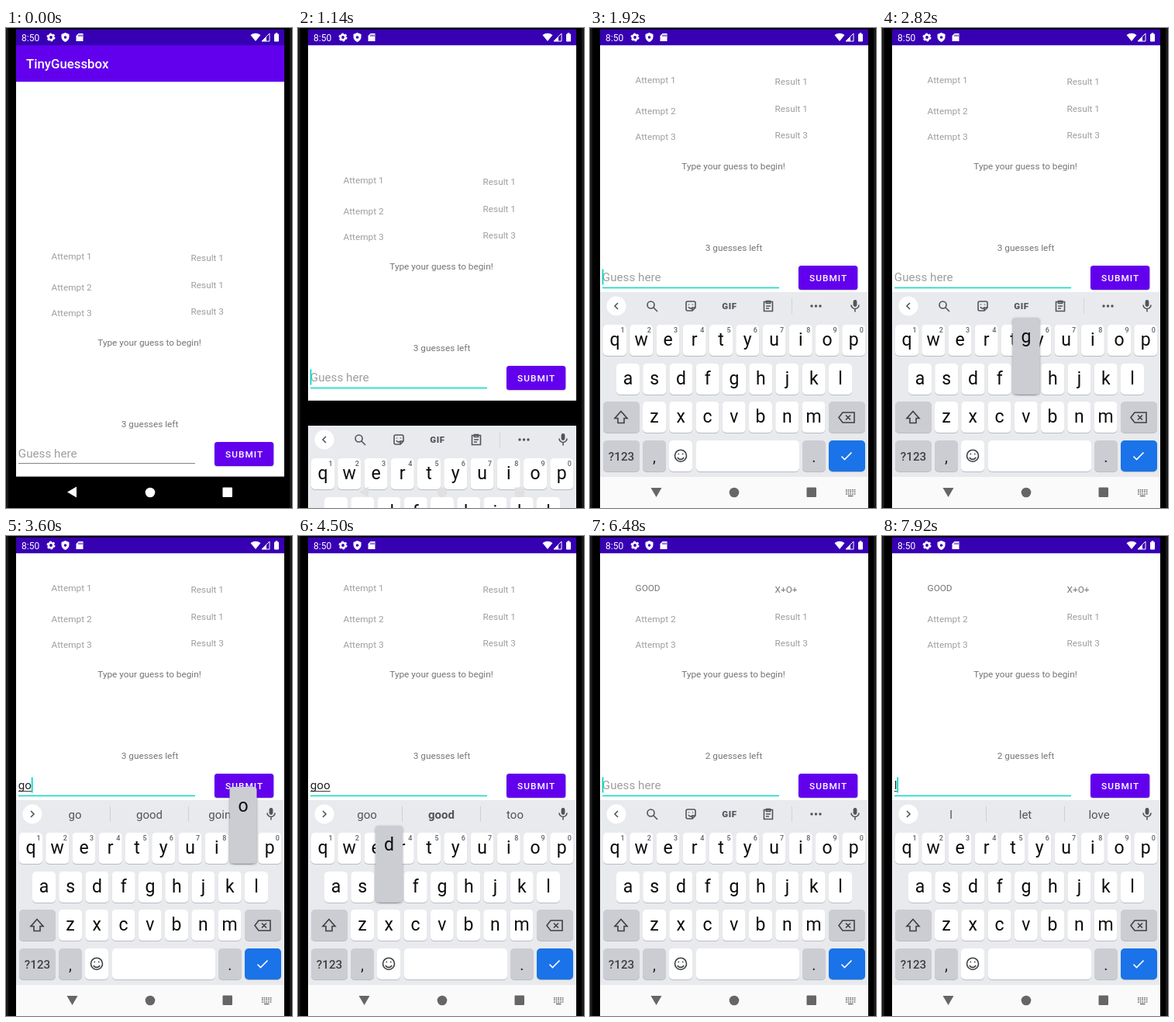
An HTML page with a canvas that plays this animation: 369x618 px, repeating every 8 s.

```html
<!DOCTYPE html>
<html lang="en">
<head>
<meta charset="utf-8">
<title>Word guessing app</title>
<style>
  html, body { margin: 0; width: 100%; height: 100%; overflow: hidden; background: #000; }
  canvas { display: block; width: 369px; height: 618px; }
</style>
</head>
<body>
<canvas id="stage"></canvas>
<script>
const W = 369, H = 618, LOOP = 8000, TICK = 60;
const canvas = document.getElementById('stage');
const ctx = canvas.getContext('2d');
const ratio = window.devicePixelRatio || 1;
canvas.width = W * ratio;
canvas.height = H * ratio;

const PURPLE = '#6200ee', TEAL = '#03dac5', GREY = '#cbcdd3', INK = '#50545a', KEY_INK = '#0c0c0d';
const STATUS_END = 22.2, APP_END = 577.8;
const SLIDE_START = 1080, SLIDE_TIME = 360, SUBMIT = 5400, CLEARED = 5460;
const PRESSES = [[2820, 'g'], [3420, 'o'], [3600, 'o'], [4500, 'd'], [7800, 'l']];
const CARET_RESETS = [940, 2880, 3470, 3650, 4550, 5410, 7850];
const SUGGESTIONS = {
  g: ['g', 'good', 'go'],
  go: ['go', 'good', 'going'],
  goo: ['goo', 'good', 'too'],
  good: ['good', 'goods', 'food'],
  l: ['l', 'let', 'love']
};

// Letter keys: [centre x, top y]
const KEYS = {};
[['qwertyuiop', 32, 382], ['asdfghjkl', 49, 432], ['zxcvbnm', 83, 481]].forEach(([row, x, y]) =>
  [...row].forEach((c, i) => KEYS[c] = [x + i * 34.25, y]));

const ICONS = {
  search: 'M3 -1.5a4.5 4.5 0 1 1 -9 0a4.5 4.5 0 1 1 9 0M2 2L7 7',
  sticker: 'M-6 -4a2 2 0 0 1 2 -2h8a2 2 0 0 1 2 2v6l-4 4h-6a2 2 0 0 1 -2 -2zM-3 1a3 3 0 0 0 5 1M-2.5 -2.5v1M2.5 -2.5v1M6 2h-4v4',
  clipboard: 'M-5.5 -5.5h11v12h-11zM-2.5 -6.5v3h5v-3zM-3 0h6M-3 3h4',
  micHead: 'M-2.4 -5a2.4 2.4 0 0 1 4.8 0v4a2.4 2.4 0 0 1 -4.8 0z',
  micStand: 'M-5 -1a5 5 0 0 0 10 0M0 4v4',
  shift: 'M0 -8L8 1H4V7H-4V1H-8Z',
  erase: 'M-10 0L-5 -6.5H10V6.5H-5ZM-1 -3l6 6M5 -3l-6 6',
  smile: 'M7.5 0a7.5 7.5 0 1 1 -15 0a7.5 7.5 0 1 1 15 0M-4 2a4.3 4.3 0 0 0 8 0M-2.7 -3v1.5M2.7 -3v1.5',
  check: 'M-6.5 0.5l4 4L6.5 -4.5',
  chevron: 'M2 -4l-4 4l4 4',
  shield: 'M0 -6L5 -4V0Q4.5 4 0 6Q-4.5 4 -5 0V-4Z',
  card: 'M-4.5 5V-2L-1.5 -5H4.5V5Z',
  wifi: 'M0 5L-6.5 -3Q0 -7.5 6.5 -3Z',
  signal: 'M-5 5L5 -5V5Z',
  back: 'M-6.5 0L5.5 -7V7Z'
};
for (const name in ICONS) ICONS[name] = new Path2D(ICONS[name]);

function box(x, y, w, h, color, radius = 0) {
  ctx.fillStyle = color;
  ctx.beginPath();
  ctx.roundRect(x, y, w, h, radius);
  ctx.fill();
}

function disc(x, y, r, color) {
  ctx.fillStyle = color;
  ctx.beginPath();
  ctx.arc(x, y, r, 0, 7);
  ctx.fill();
}

function label(text, x, y, size, color, { align = 'left', weight = 400, spacing = 0 } = {}) {
  ctx.font = `${weight} ${size}px Roboto, sans-serif`;
  ctx.textAlign = align;
  ctx.letterSpacing = spacing + 'px';
  ctx.fillStyle = color;
  ctx.fillText(text, x, y);
  return ctx.measureText(text).width;
}

function icon(name, x, y, color, { line = 1.6, fill = false, turn = 0 } = {}) {
  ctx.save();
  ctx.translate(x, y);
  ctx.rotate(turn);
  ctx.fillStyle = ctx.strokeStyle = color;
  ctx.lineWidth = line;
  if (fill) ctx.fill(ICONS[name]);
  else ctx.stroke(ICONS[name]);
  ctx.restore();
}

function withShadow(color, blur, offset, draw) {
  ctx.save();
  ctx.shadowColor = color;
  ctx.shadowBlur = blur * ratio;
  ctx.shadowOffsetY = offset * ratio;
  draw();
  ctx.restore();
}

function clipped(x, y, w, h, draw) {
  ctx.save();
  ctx.beginPath();
  ctx.rect(x, y, w, h);
  ctx.clip();
  draw();
  ctx.restore();
}

const clamp = v => Math.min(1, Math.max(0, v));

function typedText(t) {
  return PRESSES.filter(([at]) => at + TICK <= t && (t < CLEARED || at > CLEARED))
    .map(([, c]) => c).join('');
}

function caretVisible(t) {
  const reset = CARET_RESETS.filter(at => at <= t).pop();
  return reset !== undefined && Math.floor((t - reset) / 490) % 2 === 0;
}

function drawStatusBar() {
  box(13, 1.8, 346, STATUS_END - 1.8, '#3700b3');
  label('8:50', 20, 17, 12, '#fff');
  ctx.save();
  ctx.strokeStyle = '#fff';
  ctx.lineWidth = 2.6;
  ctx.beginPath();
  ctx.arc(58, 12, 3.2, 0, 7);
  ctx.stroke();
  ctx.lineWidth = 2;
  ctx.setLineDash([2.4, 2.3]);
  ctx.beginPath();
  ctx.arc(58, 12, 4.5, 0, 7);
  ctx.stroke();
  ctx.restore();
  icon('shield', 76.5, 12, '#fff', { fill: true });
  disc(76.5, 12, 1.8, '#3700b3');
  icon('card', 95, 12, '#fff', { fill: true });
  for (let i = 0; i < 3; i++) box(93.5 + i * 2, 8.5, 1, 2.5, '#3700b3');
  icon('wifi', 322, 12, '#fff', { fill: true });
  icon('signal', 335, 12, '#fff', { line: 1 });
  clipped(329, 6, 7, 12, () => icon('signal', 335, 12, '#fff', { fill: true }));
  box(346, 7.5, 6, 10, '#fff', 1);
  box(347.7, 6.3, 2.6, 2, '#fff');
}

function drawButton(t) {
  const pressed = t >= SUBMIT && t < SUBMIT + 540;
  withShadow('rgba(0,0,0,.25)', 2, 0.8, () => box(269, 533, 76.3, 31, PURPLE, 3.5));
  if (pressed) {
    const alpha = 0.13 * (1 - clamp((t - SUBMIT - 240) / 300));
    clipped(269, 533, 76.3, 31, () =>
      disc(307, 549, 15 + 30 * clamp((t - SUBMIT) / 180), `rgba(255,255,255,${alpha})`));
  }
  label('SUBMIT', 283, 553, 11.8, '#fff', { weight: 500, spacing: 1.05 });
}

function drawApp(t, text) {
  const scored = t >= CLEARED, focused = t >= 960;
  box(13, 22, 346, APP_END - 22, '#fff');
  box(13, 22, 346, 47.2, PURPLE);
  label('TinyGuessbox', 26, 52, 16.8, '#fff', { weight: 500 });

  const rows = [
    [scored ? 'GOOD' : 'Attempt 1', 58.6, 298, scored],
    ['Attempt 2', 58.6, 338], ['Attempt 3', 58.6, 371],
    [scored ? 'X+O+' : 'Result 1', 238.6, 300, scored],
    ['Result 1', 238.6, 335], ['Result 3', 238.6, 368.5]
  ];
  for (const [str, x, y, strong] of rows) label(str, x, y, 11.8, strong ? '#757575' : '#9e9e9e');
  label('Type your guess to begin!', 185, 408.6, 11.8, '#757575', { align: 'center' });
  label(`${scored ? 2 : 3} guesses left`, 185.5, 513.6, 11.8, '#757575', { align: 'center' });

  const width = label(text || 'Guess here', 15.8, 553, 15.2, text ? '#222' : '#9e9e9e');
  if (text) box(15.8, 555.2, width, 1, '#222');
  box(16, focused ? 560.8 : 560, 228, focused ? 1.4 : 1, focused ? TEAL : '#858585');
  if (caretVisible(t)) box(15.6 + (text ? width : 0), 537.5, 1.8, 20, TEAL);
  drawButton(t);
}

function drawToolbar(text) {
  disc(34, 358, 12.5, '#fff');
  icon('chevron', 34, 358, INK, { turn: text ? Math.PI : 0 });
  icon('micHead', 342, 357.5, INK, { fill: true });
  icon('micStand', 342, 357.5, INK);
  if (text) {
    SUGGESTIONS[text].forEach((word, i) => label(word, [89, 185, 280][i], 364, 15, INK,
      { align: 'center', weight: text === 'goo' && i === 1 ? 700 : 400 }));
    for (const x of [134, 235]) box(x, 348, 1, 20, '#cdd0d4');
    return;
  }
  for (const [name, x] of [['search', 80], ['sticker', 130], ['clipboard', 230]]) icon(name, x, 358, INK);
  label('GIF', 180, 362, 11.5, INK, { align: 'center', weight: 900, spacing: 0.6 });
  box(260, 348, 1, 20, '#d3d6da');
  for (const x of [286, 291.5, 297]) disc(x, 358, 1.7, INK);
}

function key(x, y, w, color) {
  box(x, y + 1, w, 40, '#b9bcc1', 5);
  box(x, y, w, 40, color, 5);
}

function drawKeyboard(t, text) {
  box(13, 340, 346, 238, '#e8eaed');
  box(13, 578, 346, 40, '#fafafa');
  drawToolbar(text);

  for (const [c, [x, y]] of Object.entries(KEYS)) {
    key(x - 15, y, 30, '#fff');
    label(c, x, y + 26.8, 23, KEY_INK, { align: 'center' });
  }
  [...'1234567890'].forEach((d, i) =>
    label(d, 42 + i * 34.25, 392, 9, '#5f6368', { align: 'center', weight: 500 }));

  const extras = [[17, 481, 47, GREY], [308, 481, 47, GREY], [17, 531, 47, GREY], [68, 531, 30, GREY],
    [102, 531, 30, '#fff'], [137, 531, 133, '#fff'], [274, 531, 30, GREY], [308, 531, 47, '#1a73e8']];
  for (const extra of extras) key(...extra);
  icon('shift', 40, 501.5, '#3c4043');
  icon('erase', 331, 501.5, '#3c4043');
  label('?123', 40.5, 556.5, 15.2, '#3c4043', { align: 'center', weight: 500 });
  label(',', 83, 559, 20, '#222', { align: 'center' });
  label('.', 289, 559, 20, '#222', { align: 'center' });
  icon('smile', 117, 550.7, '#3c4043');
  icon('check', 331, 551, '#fff');

  const press = PRESSES.find(([at]) => t >= at && t < at + 2 * TICK);
  if (press) {
    const [x, y] = KEYS[press[1]];
    withShadow('rgba(0,0,0,.35)', 3, 1, () => box(x - 17.5, y - 59, 35, 98.5, GREY, 4));
    label(press[1], x, y - 27, 23, KEY_INK, { align: 'center' });
  }
}

function drawNavigation(t) {
  const shade = Math.round(255 - 153 * clamp((t - SLIDE_START) / 300));
  const color = `rgb(${shade},${shade},${shade})`;
  icon('back', 85.5, 597.5, color, { fill: true, turn: -Math.PI / 2 * clamp((t - 1290) / 150) });
  disc(186, 598, 6.3, color);
  box(279.5, 591.5, 12.5, 12.5, color, 1);
  if (t < 1200) return;
  for (let row = 0; row < 3; row++)
    for (let col = 0; col < 5; col++)
      box(330 + col * 2.7, 594 + row * 2.6, 1.6, 1.5, color);
  box(333, 601.8, 6.5, 1.4, color);
}

function draw(t) {
  const text = typedText(t);
  const left = 1 - clamp((t - SLIDE_START) / SLIDE_TIME);
  const pan = Math.round(227 * (1 - left ** 3.1));
  const drop = Math.round(278 * left ** 2.63);

  ctx.setTransform(ratio, 0, 0, ratio, 0, 0);
  box(0, 0, W, H, '#000');
  for (const x of [0, 366]) box(x, 0, 3, H, '#1a1a1a');
  clipped(13, 22, 346, APP_END - 22, () => {
    ctx.translate(0, -pan);
    drawApp(t, text);
  });
  clipped(13, 22, 346, 596, () => {
    ctx.translate(0, drop);
    drawKeyboard(t, text);
  });
  drawNavigation(t);
  drawStatusBar();
}

function frame() {
  const t = performance.now() % LOOP;
  draw(Math.floor(t / TICK) * TICK);
  requestAnimationFrame(frame);
}
frame();
</script>
</body>
</html>
```
